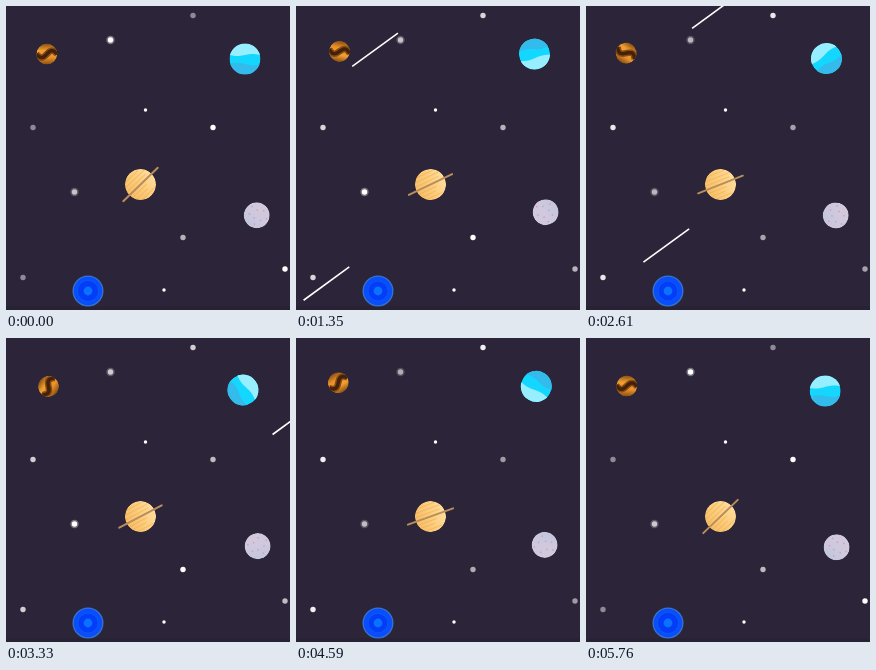
Recreate the animation shown at these times as an HTML page with a canvas. Size 284x304 px, loop 5790 ms.

```html
<!DOCTYPE html>
<html>
<head>
<meta charset="utf-8">
<style>
html, body { margin: 0; width: 284px; height: 304px; overflow: hidden; background: #2c2539; }
canvas { display: block; }
</style>
</head>
<body>
<canvas id="sky" width="284" height="304"></canvas>
<script>
const c = document.getElementById('sky').getContext('2d');
const LOOP = 5790, TAU = Math.PI * 2;

function disc(x, y, r, fill) {
  c.fillStyle = fill;
  c.beginPath();
  c.arc(x, y, r, 0, TAU);
  c.fill();
}

function line(color, width, x1, y1, x2, y2) {
  c.strokeStyle = color;
  c.lineWidth = width;
  c.beginPath();
  c.moveTo(x1, y1);
  c.lineTo(x2, y2);
  c.stroke();
}

// One sine period across a planet of radius r
function wave(r, y, height) {
  c.beginPath();
  for (let x = -r; x <= r; x++) c.lineTo(x, y + height * Math.sin(Math.PI * x / r));
}

function wavyLine(r, y, height, color, width) {
  wave(r, y, height);
  c.strokeStyle = color;
  c.lineWidth = width;
  c.stroke();
}

// Fills from the wave to the planet's top or bottom edge
function wavyCap(r, y, height, color) {
  wave(r, y, height);
  const edge = Math.sign(y) * r;
  c.lineTo(r, edge);
  c.lineTo(-r, edge);
  c.fillStyle = color;
  c.fill();
}

function blend(x1, y1, x2, y2, ...colors) {
  const g = c.createLinearGradient(x1, y1, x2, y2);
  colors.forEach((color, i) => g.addColorStop(i / (colors.length - 1), color));
  return g;
}

// Turns a planet about a pivot slightly off its centre
function planet(x, y, angle, dx, dy, r, texture) {
  c.save();
  c.translate(x, y);
  c.rotate(angle);
  c.translate(dx, dy);
  c.beginPath();
  c.arc(0, 0, r, 0, TAU);
  c.clip();
  texture(r);
  c.restore();
}

function amber(r) {
  disc(0, 0, r, blend(0, -r, 0, r, '#8a4d10', '#f0a032', '#e8922a', '#8a4d10'));
  wavyLine(r, 0, -3.5, '#8a4c12', 6.5);
  wavyLine(r, 0, -3.5, '#43210b', 3.5);
}

function aqua(r) {
  disc(0, 0, r, '#14d7ff');
  wavyCap(r, -4, -1, '#97eeff');
  wavyCap(r, 5, 1.3, '#33bbeb');
}

function moon(r) {
  disc(0, 0, r, blend(-r, r, r, -r, '#bcc5de', '#d0c8dd', '#d6c9da'));
  for (let i = 1; i < 9; i++) {
    const a = i * 2.4, d = Math.sqrt(i) * 3.7;
    disc(d * Math.cos(a), d * Math.sin(a), .9, i % 2 ? '#9fb6dc' : '#d3a3bb');
  }
}

function saturnBody(r) {
  disc(0, 0, r, blend(-r, 0, r, 0, '#f6bd66', '#fccd7c', '#ffdc9c'));
  for (let y = -12; y <= 12; y += 4) line('rgba(236,168,78,.5)', 1, -r, y, 8 - y % 3 * 3, y);
}

function saturn(tilt) {
  planet(134.5, 178.5, tilt, 0, 0, 15.5, saturnBody);
  c.save();
  c.translate(134.5, 178.5);
  c.rotate(tilt);
  c.lineCap = 'round';
  line('#b98d5c', 2, -24, 0, 24, 0);
  c.restore();
}

function star(x, y, glow, halo) {
  c.globalAlpha = .47 + .53 * glow;
  if (halo) disc(x, y, 4.2, 'rgba(255,255,255,.35)');
  disc(x, y, 2.7, '#fff');
  c.globalAlpha = 1;
}

function drawStars(pulse) {
  const early = pulse(0), middle = pulse(.2), late = pulse(.5);
  star(187, 9.5, early);
  star(27, 121.5, early);
  star(17, 271.5, early);
  star(177, 231.5, middle);
  star(68.5, 186, middle, true);
  star(207, 121.5, late);
  star(279, 263, late);
  star(104.5, 34, late, true);
  disc(139.5, 104, 1.7, '#fff');
  disc(158, 284, 1.7, '#fff');
}

function blueRings(squeeze) {
  disc(82, 285, 15.5, '#3674cc');
  disc(82, 285, 14.2, '#0a4dfb');
  disc(82, 285, 11 - squeeze, '#0a5cf4');
  disc(82, 285, 10.2 - squeeze, '#033df7');
  disc(82, 285, 4.4, '#0a72ff');
}

// Three passes down to the left, entering at (x0, y0)
function meteor(t, start, x0, y0) {
  for (let pass = 0; pass < 3; pass++) {
    const d = (t - start - pass * 1429) * .295;
    const x = x0 - d, y = y0 + d * .7636;
    if (d > -5) line('#fff', 1.6, x, y, x + 45.7, y - 33.3);
  }
}

function draw(t) {
  const turn = t / LOOP;
  const pulse = phase => (1 - Math.cos(TAU * (turn * 3 - phase))) / 2;
  const spin = TAU * 2 * turn;

  c.fillStyle = '#2c2539';
  c.fillRect(0, 0, 284, 304);
  c.fillStyle = '#282235';
  c.fillRect(0, 300, 284, 4);

  drawStars(pulse);
  planet(42, 46.6, -spin, -1.2, 1.5, 10.5, amber);
  planet(239, 50.5, spin, 0, 2.5, 15.5, aqua);
  planet(250, 207.8, -spin, .7, 1.5, 13, moon);
  saturn((-44 + 28 * pulse(0)) * Math.PI / 180);
  blueRings(pulse(0));

  c.lineCap = 'butt';
  meteor(t, 414, 284, 83.2);
  meteor(t, 1083, 135.3, 0);
}

function tick() {
  draw(performance.now() % LOOP);
  requestAnimationFrame(tick);
}
tick();
</script>
</body>
</html>
```
